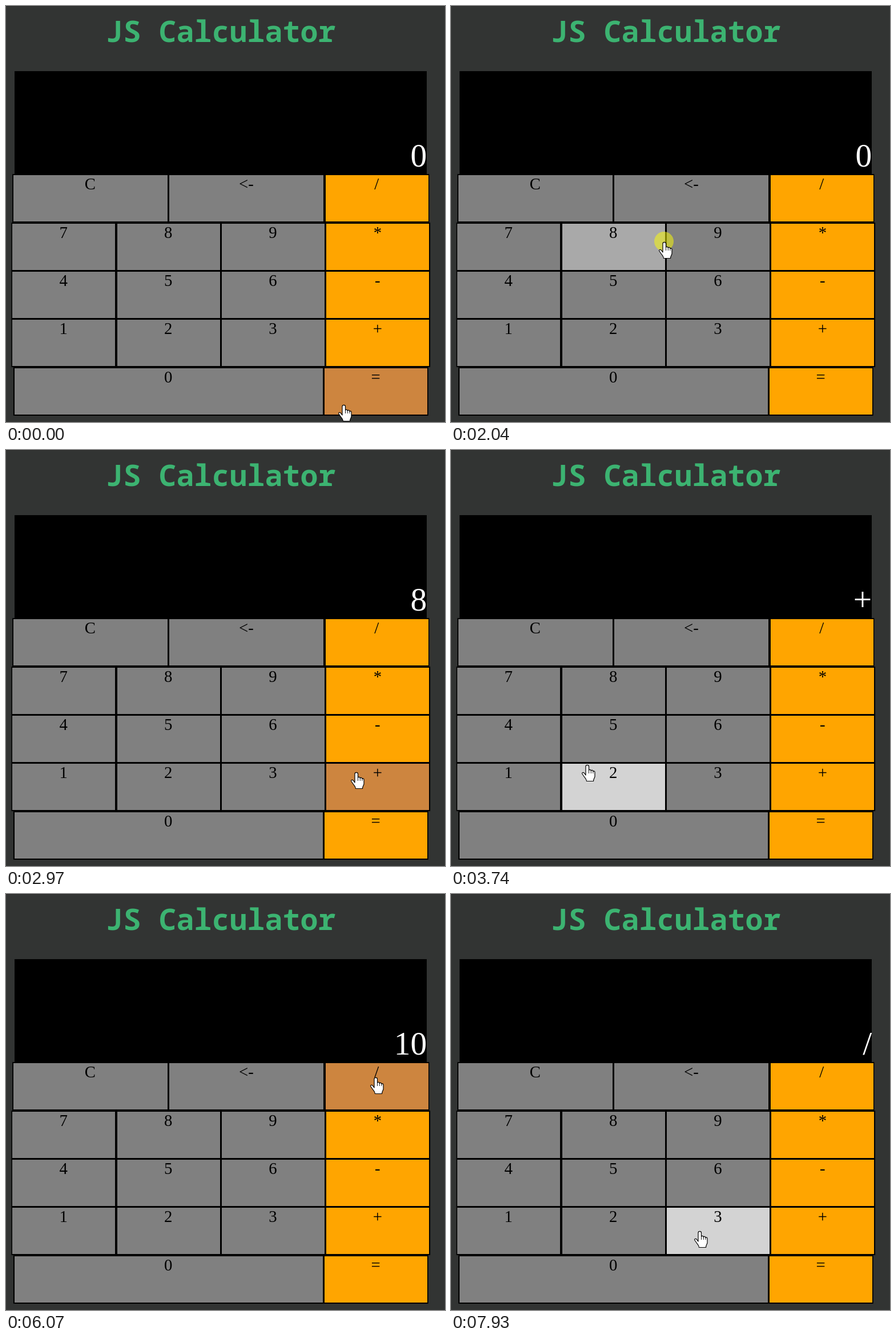
Recreate the animation shown at these times as an HTML page with a canvas. Size 769 px wide and 728 px high, loop 8 s.

```html
<!DOCTYPE html>
<html lang="en">
<head>
<meta charset="utf-8">
<title>JS Calculator</title>
<style>
  html, body { margin: 0; width: 769px; height: 728px; overflow: hidden; background: #323433; }
  canvas { display: block; }
</style>
</head>
<body>
<canvas width="769" height="728"></canvas>
<script>
const ctx = document.querySelector('canvas').getContext('2d');
const LOOP = 8000;
const TICK = 70; // the pointer is redrawn about this often while it moves
const UNIT = 180, BORDER = 1.7, CENTER = 376.3;
const ROW_TOP = 296.3, ROW_PITCH = 84.3, KEY_HEIGHT = 81;

const plain = { rest: '#808080', hover: '#d3d3d3', active: '#a9a9a9' };
const operator = { rest: '#ffa500', hover: '#cd853f', active: '#ff8c00' };

// Labels of each row; every row spans four units and its last key is an operator.
const rows = ['C <- /', '7 8 9 *', '4 5 6 -', '1 2 3 +', '0 ='].map((line, index) => {
  const labels = line.split(' ');
  const plainWidth = 3 * UNIT / (labels.length - 1);
  const width = 4 * UNIT + 2 * BORDER * labels.length;
  const left = CENTER - width / 2;
  const top = Math.round(ROW_TOP + index * ROW_PITCH);
  const keys = labels.map((label, i) => {
    const last = i === labels.length - 1;
    const x = left + BORDER + i * (plainWidth + 2 * BORDER);
    return { label, x, width: last ? UNIT : plainWidth, colors: last ? operator : plain };
  });
  return { keys, left, width, top };
});

// Pointer strokes: start, end, x and y of the destination, downward bow of the path.
const start = { x: 592, y: 698 };
const strokes = [
  [70, 70, 579, 682, 0],
  [420, 570, 374, 413, 0],
  [2490, 2970, 614, 564, 36],
  [3580, 3740, 239, 551, -25],
  [4590, 4900, 721, 689, -15],
  [5920, 6070, 648, 321, 0],
  [6930, 7080, 517, 475, 25],
  [7480, 7620, 379, 512, 0],
  [7850, 7930, 436, 590, 0],
];

// Clicks: press time, release time, resulting display.
const clicks = [
  [2040, 2130, '8'], [3200, 3260, '+'], [4120, 4270, '+2'],
  [5220, 5380, '10'], [6470, 6620, '/'],
];

const hand = new Path2D(`M-3 18V3C-3-.4 2.5-.4 2.5 3V9.5C3.5 7.7 6 8 6.3 10.3
  C7.5 8.7 9.7 9.2 9.9 11.5C11.3 10.3 13 11.2 13 13.2V20C13 23 10.5 24 10.5 28.5
  H-1.5C-1.5 24.5-5 22.5-6.5 19.5L-9 16C-10.3 13.6-7.3 12.4-5.6 14.3Z`);
const fingers = new Path2D('M2.5 9V15M6.3 10V15M9.9 11V15');

function pointerAt(time) {
  let { x, y } = start;
  for (const [from, to, endX, endY, bow] of strokes) {
    if (time < from) break;
    const gaps = Math.round((to - from) / TICK);
    const step = time < to ? Math.floor((time - from) / (to - from) * gaps) : gaps;
    const p = (step + 1) / (gaps + 1);
    x += (endX - x) * p;
    y += (endY - y) * p + bow * 4 * p * (1 - p);
  }
  return { x, y };
}

function rect(color, x, y, width, height) {
  ctx.fillStyle = color;
  ctx.fillRect(x, y, width, height);
}

function text(string, x, y, font, color, align = 'center') {
  ctx.font = font;
  ctx.fillStyle = color;
  ctx.textAlign = align;
  ctx.fillText(string, x, y);
}

function drawRow({ keys, left, width, top }, pointer, pressed) {
  rect('#000', left, top - 2, width, KEY_HEIGHT + 4);
  const inRow = pointer.y >= top - 2 && pointer.y < top + KEY_HEIGHT + 2;
  for (const key of keys) {
    const over = inRow && pointer.x >= key.x - BORDER && pointer.x < key.x + key.width + BORDER;
    const state = !over ? 'rest' : pressed ? 'active' : 'hover';
    const x = Math.round(key.x);
    rect(key.colors[state], x, top, Math.round(key.x + key.width) - x, KEY_HEIGHT);
    text(key.label, key.x + key.width / 2 - 0.5, top + 25.3,
      '28.8px "Liberation Serif", serif', '#000');
  }
}

function drawPointer({ x, y }, pressed) {
  if (pressed) {
    ctx.fillStyle = 'rgba(255, 255, 0, .5)';
    ctx.beginPath();
    ctx.arc(x - 1, y - 1, 17, 0, 2 * Math.PI);
    ctx.fill();
  }
  ctx.save();
  ctx.translate(x, y);
  ctx.fillStyle = '#fff';
  ctx.strokeStyle = '#000';
  ctx.lineJoin = 'round';
  ctx.lineWidth = 1.2;
  ctx.fill(hand);
  ctx.stroke(hand);
  ctx.lineWidth = 0.9;
  ctx.stroke(fingers);
  ctx.restore();
}

function draw(time) {
  const pointer = pointerAt(time);
  const pressed = clicks.some(([down, up]) => time >= down && time < up);
  const value = clicks.findLast(([, up]) => up <= time)?.[2] ?? '0';

  rect('#323433', 0, 0, 769, 728);
  rect('#2a2b2a', 0, 0, 769, 1);
  text('JS Calculator', 376, 62.6, 'bold 51.7px "Noto Sans Mono", monospace', '#3cb371');
  rect('#000', 15, 114, 722, 181);
  text(value, 737.2, 280.5, '57.5px "Liberation Serif", serif', '#fff', 'right');
  for (const row of rows) drawRow(row, pointer, pressed);
  drawPointer(pointer, pressed);
}

function tick() {
  draw(performance.now() % LOOP);
  requestAnimationFrame(tick);
}
tick();
</script>
</body>
</html>
```
